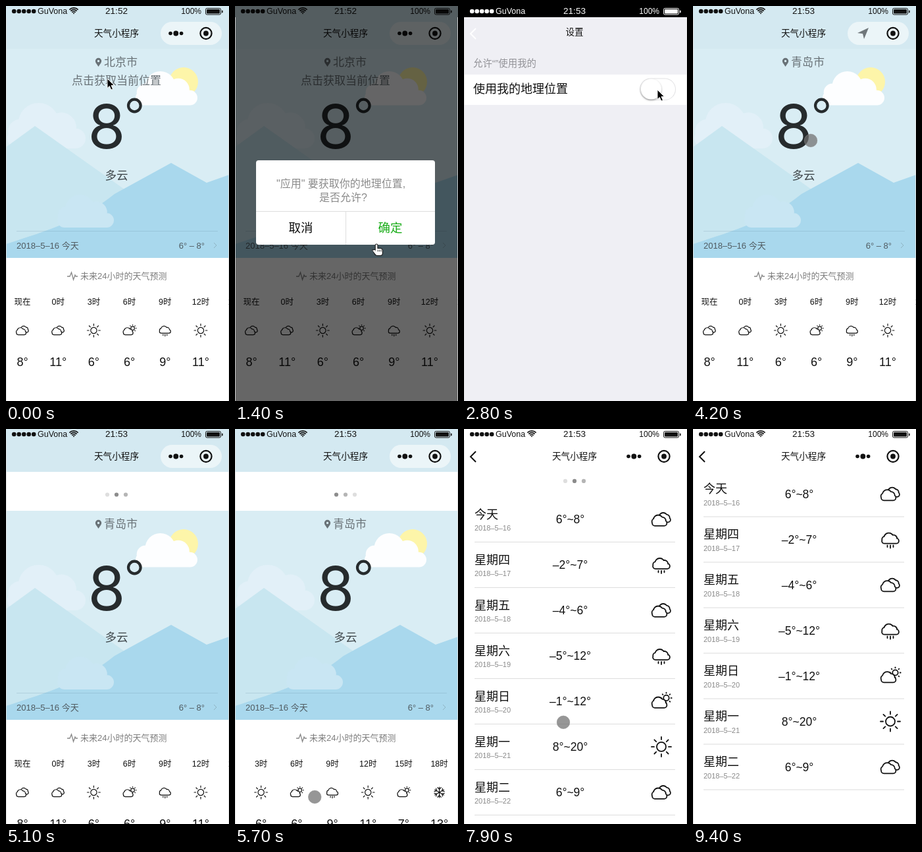
Animation of 339x599 px, one loop 9500 ms. Source, as an HTML page with a canvas:

```html
<!DOCTYPE html>
<html lang="zh-CN">
<head>
<meta charset="utf-8">
<style>
html, body { margin: 0; width: 100%; height: 100%; overflow: hidden; background: #fff; }
canvas { display: block; width: 339px; height: 599px; }
</style>
</head>
<body>
<canvas id="stage"></canvas>
<script>
const W = 339, H = 599, LOOP = 9500, HEADER = 65, MID = 168, INK = '#111';
const FONT = '"Liberation Sans", "Noto Sans CJK SC", "Noto Sans CJK", "Noto Sans CJK JP", sans-serif';
const canvas = document.getElementById('stage');
const ratio = window.devicePixelRatio || 1;
canvas.width = W * ratio;
canvas.height = H * ratio;
const c = canvas.getContext('2d');

// 0 before start, 1 after start + duration, smooth between.
function ease(t, start, duration) {
  const p = Math.min(1, Math.max(0, (t - start) / duration));
  return p * p * (3 - 2 * p);
}
const during = (t, start, end, duration) => ease(t, start, duration) - ease(t, end, duration);

// y is the visual middle of the line.
function text(s, x, y, size, color = INK, align = 'left', font = FONT) {
  c.font = `${size}px ${font}`;
  c.fillStyle = color;
  c.textAlign = align;
  c.fillText(s, x, y + size * 0.36);
}
function rect(x, y, w, h, color) {
  c.fillStyle = color;
  c.fillRect(x, y, w, h);
}
function pill(x, y, w, h, r, color) {
  c.beginPath();
  c.roundRect(x, y, w, h, r);
  c.fillStyle = color;
  c.fill();
}
function disc(x, y, r, color) {
  c.beginPath();
  c.arc(x, y, r, 0, 7);
  c.fillStyle = color;
  c.fill();
}
function ring(x, y, r, width, color, from = 0, to = 7) {
  c.beginPath();
  c.arc(x, y, r, from, to);
  c.lineWidth = width;
  c.strokeStyle = color;
  c.stroke();
}
function trace(points) {
  c.beginPath();
  points.forEach(p => c.lineTo(...p));
}
function poly(points, color) {
  trace(points);
  c.fillStyle = color;
  c.fill();
}
function line(points, width, color) {
  trace(points);
  c.lineWidth = width;
  c.strokeStyle = color;
  c.stroke();
}
function shifted(x, y, draw, scale = 1) {
  c.save();
  c.translate(x, y);
  c.scale(scale, scale);
  draw();
  c.restore();
}
function belowHeader(draw) {
  c.save();
  c.beginPath();
  c.rect(0, HEADER, W, H);
  c.clip();
  draw();
  c.restore();
}

// One cloud rule: a rounded base and three puffs, in proportion to its box.
function cloud(x, y, w, h, color, outline = 0) {
  const puff = (px, py, r) => {
    c.moveTo(x + w * px + h * r, y + h * py);
    c.arc(x + w * px, y + h * py, h * r, 0, Math.PI * 2);
  };
  c.beginPath();
  puff(0.4, 0.45, 0.45);
  puff(0.69, 0.54, 0.33);
  puff(0.16, 0.62, 0.26);
  c.roundRect(x, y + h * 0.56, w, h * 0.44, h * 0.22);
  if (outline) {
    c.lineWidth = outline * 2;
    c.strokeStyle = INK;
    c.stroke();
  }
  c.fillStyle = color;
  c.fill();
}

function spokes(count, inner, outer) {
  for (let i = 0; i < count; i++) {
    c.save();
    c.rotate(i * Math.PI * 2 / count);
    line([[0, -inner], [0, -outer]], 1.8, INK);
    c.restore();
  }
}
function sun(r, gap, ray) {
  ring(0, 0, r, 1.8, INK);
  spokes(8, r + gap, r + gap + ray);
}
const frontCloud = () => cloud(-13, -5.5, 20.5, 14.5, '#fff', 1.8);
const icons = {
  cloudy() {
    cloud(-4, -9, 17, 12.5, '#fff', 1.8);
    frontCloud();
  },
  rain() {
    cloud(-12, -9, 24, 14.3, '#fff', 1.8);
    for (let i = -1; i <= 1; i++) line([[i * 4.5, 9], [i * 4.5, 13 - Math.abs(i) * 1.5]], 1.8, INK);
  },
  partly() {
    shifted(7.5, -5, () => sun(4.2, 3, 1));
    frontCloud();
  },
  sun: () => sun(7, 4, 4),
  snow() {
    spokes(6, 0, 12);
    for (let i = 0; i < 6; i++) {
      c.rotate(Math.PI / 3);
      line([[-4, -11], [0, -7], [4, -11]], 1.8, INK);
    }
  }
};
function icon(name, x, y, scale = 1) {
  shifted(x, y, () => {
    c.lineCap = c.lineJoin = 'round';
    icons[name]();
  }, scale);
}

function statusBar(clock, color, wifi = true) {
  for (let i = 0; i < 5; i++) disc(12.2 + i * 7.5, 8, 3.3, color);
  text('GuVona', 48, 7.2, 12.5, color);
  if (wifi) for (let r = 1; r < 10; r += 2.8) ring(103, 12.3, r, 1.7, color, -2.35, -0.79);
  text(clock, MID, 7.2, 13.5, color, 'center');
  text('100%', 297, 7.5, 12, color, 'right');
  c.beginPath();
  c.roundRect(303.5, 3.5, 23, 9.5, 2);
  c.lineWidth = 1;
  c.strokeStyle = color;
  c.stroke();
  pill(305, 5, 20, 6.5, 1, color);
  pill(328, 6.5, 1.6, 4, 0.8, color);
}

function capsule(background, locating) {
  pill(235, 24, 93, 35, 17.5, background);
  if (locating) poly([[267, 33], [250, 41], [258, 42], [260, 50]], '#70777b');
  else for (let i = -1; i <= 1; i++) disc(258.3 + i * 8.3, 41.5, 3.9 - Math.abs(i) * 1.1, INK);
  ring(304, 41.5, 8.6, 2.2, INK);
  disc(304, 41.5, 3.9, INK);
}
const title = (s, y = 41) => text(s, MID, y, 13.6, INK, 'center');
const backArrow = color => line([[18, 34], [10, 42], [18, 50]], 2, color);

// Three dots that pass their shades along.
function loader(t, pull) {
  if (pull < 0.5) return;
  const step = Math.floor(t / 300);
  for (let i = 0; i < 3; i++) {
    const shade = 140 + (i + 100 - step) % 3 * 41;
    disc(154 + i * 14, HEADER + pull - 24.5, 3.1, `rgb(${shade},${shade},${shade})`);
  }
}

const homePull = t => 59 * during(t, 4200, 6100, 500);
const listPull = t => 59 * (ease(t, 7600, 500) - ease(t, 8700, 400));
const hourScroll = t => -132 * ease(t, 5250, 700);

function landscape() {
  rect(0, HEADER, W, 382 - HEADER, '#d9edf4');
  disc(270, 115, 22, '#fdf5a9');
  cloud(197, 99, 94, 51.5, '#fdfeff');
  cloud(2, 147, 119, 69, '#e2f0f8');
  poly([[0, 214], [44, 182], [180, 278], [225, 382], [0, 382]], '#c8e6f0');
  c.beginPath();
  c.moveTo(0, 361);
  c.bezierCurveTo(65, 340, 115, 325, 165, 285);
  [[251, 238], [305, 268], [W, 256], [W, 382], [0, 382]].forEach(p => c.lineTo(...p));
  c.fillStyle = '#a9d8ed';
  c.fill();
  cloud(78, 286, 86, 50, '#c9e6f3');
}

const hours = 'cloudy 8,cloudy 11,sun 6,partly 6,rain 9,sun 11,partly 7,snow 13,cloudy 8'
  .split(',').map(s => s.split(' '));

function place(located) {
  const grey = '#697277';
  ring(140.5, 83.5, 3.2, 3, grey);
  poly([[136.5, 86], [144.5, 86], [140.5, 92]], grey);
  text(located ? '青岛市' : '北京市', 149, 85, 17, grey);
  if (!located) text('点击获取当前位置', MID, 113, 17, grey, 'center');
}

function home(t) {
  const located = t > 3400, pull = homePull(t);
  rect(0, 0, W, H, '#fff');
  belowHeader(() => {
    loader(t, pull);
    c.translate(0, pull);
    landscape();
    place(located);
    text('8', 153, 183, 92, '#262b2d', 'center', 'Inter, sans-serif');
    ring(195.3, 151, 9.3, 4.2, '#262b2d');
    text('多云', MID, 257, 17.5, '#3f474b', 'center');

    rect(16, 341, 306, 1, 'rgba(70,110,130,.17)');
    text('2018–5–16 今天', 16, 363, 13, '#505b61');
    text('6° – 8°', 302, 363, 13, '#505b61', 'right');
    line([[316, 359], [320, 363], [316, 367]], 1, '#8eb2c2');

    line([[93, 410], [97, 410], [99.5, 404], [102.5, 415], [105, 408], [106, 410], [109, 410]], 1.3, '#888');
    text('未来24小时的天气预测', 113, 409.5, 13, '#7d7d7d');
    hours.forEach(([sky, degrees], i) => {
      const x = 25 + i * 54.2 + hourScroll(t);
      text(i ? `${i * 3 - 3}时` : '现在', x, 448, 12.5, INK, 'center');
      icon(sky, x, 492, 0.66);
      text(degrees + '°', x, 540, 18, INK, 'center');
    });
  });
  rect(0, 0, W, HEADER, '#d4e9f1');
  title('天气小程序');
  capsule('rgba(255,255,255,.55)', located && t < 4700);
  statusBar(located ? '21:53' : '21:52', INK);
}

function dialog(alpha) {
  c.save();
  c.globalAlpha = alpha;
  rect(0, 0, W, H, 'rgba(0,0,0,.6)');
  pill(32, 234, 272, 128, 4, '#fff');
  text('"应用" 要获取你的地理位置,', 63, 269, 16, '#8b8b8b');
  text('是否允许?', 128, 290, 16, '#8b8b8b');
  rect(32, 311, 272, 1, '#dedede');
  rect(MID, 312, 1, 50, '#dedede');
  text('取消', 100, 336.5, 18.5, INK, 'center');
  text('确定', 236, 336.5, 18.5, '#1aad19', 'center');
  c.restore();
}

function settings(t) {
  const on = ease(t, 2950, 200);
  rect(0, 0, W, H, '#efeff4');
  rect(0, 0, W, 17, '#000');
  statusBar('21:53', '#fff', false);
  title('设置', 39.5);
  backArrow('#fff');
  text('允许“”使用我的', 14, 87, 14.4, '#929297');
  rect(0, 104, W, 46, '#fff');
  text('使用我的地理位置', 14, 126, 18);
  pill(267, 109.5, 55, 33.5, 17, '#e2e2e4');
  pill(268, 110.5, 53, 31.5, 16, on > 0.5 ? '#4cd964' : '#fff');
  c.save();
  c.shadowColor = 'rgba(0,0,0,.35)';
  c.shadowBlur = 3 * ratio;
  c.shadowOffsetY = 1.5 * ratio;
  disc(284.5 + on * 20, 126, 15.6, '#fff');
  c.restore();
}

const days = '今天 6°~8° cloudy,星期四 –2°~7° rain,星期五 –4°~6° cloudy,星期六 –5°~12° rain,星期日 –1°~12° partly,星期一 8°~20° sun,星期二 6°~9° cloudy'
  .split(',').map(s => s.split(' '));

function forecast(t) {
  const pull = listPull(t);
  rect(0, 0, W, H, '#fff');
  belowHeader(() => {
    loader(t, pull);
    days.forEach(([name, range, sky], i) => {
      const y = pull + i * 69;
      text(name, 16, y + 91, 18);
      text(`2018–5–${16 + i}`, 16, y + 111.6, 11, '#8a8a8a');
      text(range, 161.5, y + 98.4, 17.5, INK, 'center');
      icon(sky, 300, y + 98.5);
      rect(16, y + 132.5, 305, 1, '#dcdcdc');
    });
  });
  title('天气小程序');
  backArrow(INK);
  capsule('#fff', false);
  statusBar('21:53', INK);
}

function arrow() {
  const shape = [[0, 0], [0, 14.5], [3.4, 11.4], [5.8, 17], [8.4, 15.9], [6, 10.5], [10.5, 10.5]];
  poly([...shape, shape[0]], '#000');
  line([...shape, shape[0]], 0.9, '#fff');
}
function hand() {
  [[1, INK], [0, '#fff']].forEach(([edge, color]) => {
    const part = (x, y, w, h, r) => pill(x - edge, y - edge, w + 2 * edge, h + 2 * edge, r + edge, color);
    part(-1.2, 0.5, 2.6, 12, 1.3);
    part(-1.2, 7, 10, 10, 3);
    poly([[-6 - edge, 9.5 - edge], [-2, 9 - edge], [1, 17], [-1 - edge, 16 + edge]], color);
  });
  for (let x = 2.2; x < 8; x += 2.4) line([[x, 8.5], [x, 11.5]], 0.8, INK);
}

// Where the pointer goes next, and when it sets off.
const stops = [
  { leave: 700, x: 215, y: 361 }, { leave: 2000, x: 294, y: 127 },
  { leave: 3050, x: 14, y: 40 }, { leave: 3700, x: 179, y: 204 }
];
function pointer(t) {
  let x = 154, y = 110;
  for (const stop of stops) {
    const p = ease(t, stop.leave, 500);
    x += (stop.x - x) * p;
    y += (stop.y - y) * p;
  }
  shifted(x, y, t > 1150 && t < 2050 ? hand : arrow);
}

function touch(x, y) {
  disc(x, y, 10, 'rgba(110,110,110,.72)');
  ring(x, y, 9.8, 0.8, 'rgba(150,150,150,.5)');
}
// The finger travels twice as far as the page it pulls.
function touches(t) {
  const held = (start, end) => t >= start && t < end;
  if (held(4150, 4750)) touch(179, 204 + 2 * homePull(t));
  if (held(5200, 5980)) touch(215 + hourScroll(t), 558);
  if (held(6600, 6800)) touch(186, 362);
  if (held(7500, 8150)) touch(151, 368 + 2 * listPull(t));
}

function render(t) {
  c.setTransform(ratio, 0, 0, ratio, 0, 0);
  const settingsX = W * (1 - during(t, 1850, 3500, 300));
  const forecastX = W * (1 - ease(t, 6850, 300));
  if (settingsX > 0 && forecastX > 0) home(t);
  if (t > 850 && t < 1900) dialog(during(t, 850, 1700, 200));
  if (settingsX < W) shifted(settingsX, 0, () => settings(t));
  if (forecastX < W) shifted(forecastX, 0, () => forecast(t));
  if (t < 4150) pointer(t);
  touches(t);
  for (const x of [0, W - 1]) rect(x, 17, 1, H, 'rgba(225,225,225,.8)');
}

const start = performance.now();
function frame() {
  render((performance.now() - start) % LOOP);
  requestAnimationFrame(frame);
}
frame();
</script>
</body>
</html>
```
